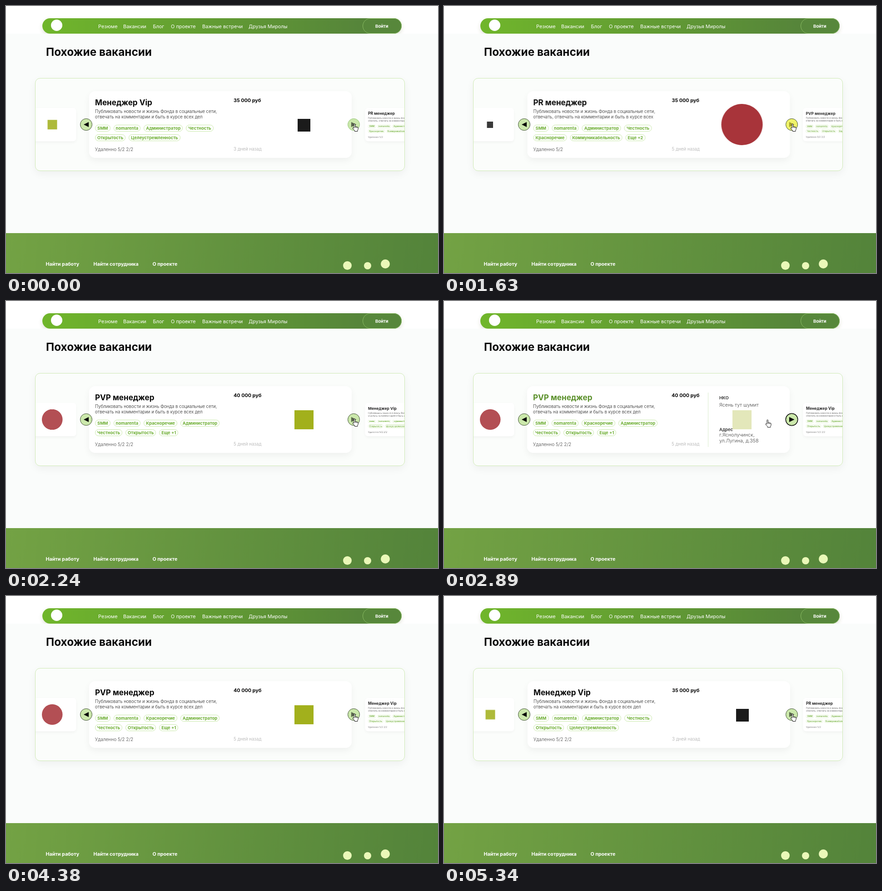
An HTML page for the animation above (5700 ms loop, 951 by 589 pixels).

```html
<!DOCTYPE html>
<html lang="ru">
<head>
<meta charset="utf-8">
<title>Похожие вакансии</title>
<style>
html, body { margin: 0; width: 100%; height: 100%; overflow: hidden; }
body { position: relative; background: #fafcfb; font-family: Inter, "Open Sans", sans-serif; }
div, svg { position: absolute; box-sizing: border-box; }
.text { white-space: nowrap; line-height: 20px; }
header { position: absolute; left: 0; top: 0; width: 100%; height: 61px; background: #fff; overflow: hidden; }
.bar { left: 80px; top: 27px; width: 791px; height: 34px; border-radius: 17px;
  background: linear-gradient(90deg, #70b62b, #56853a 88%); box-shadow: 0 4px 10px rgba(90, 100, 40, .18); }
.login { left: 785px; top: 27px; width: 86px; height: 34px; border-radius: 17px;
  border: 1px solid #8bbd63; background: #57873b; }
footer { position: absolute; left: 0; top: 501px; width: 100%; height: 88px;
  background: linear-gradient(100deg, #73a244, #53833a); }
.frame { left: 64px; top: 159px; width: 814px; height: 205px; border: 1px solid #cfeab5; border-radius: 11px;
  background: #fbfdfb; overflow: hidden; }
.glow { left: 64px; top: 159px; width: 814px; height: 205px; border-radius: 11px; box-shadow: 0 6px 18px rgba(0, 0, 0, .05); }
.track { left: 0; top: 0; width: 100%; height: 100%; }
.card { top: 28px; width: 578px; height: 147px; border-radius: 13px; background: #fff;
  box-shadow: 0 6px 16px rgba(0, 0, 0, .05); }
.tags { left: 13px; display: flex; gap: 7px; }
.tags span { box-sizing: border-box; height: 15px; padding: 0 4px; border: 1px solid #c8e8a8; border-radius: 8px;
  font: 700 9.4px/13px Inter, "Open Sans", sans-serif; color: #6dae32; white-space: nowrap; }
.round { border-radius: 50%; }
.details { left: 0; top: 0; width: 100%; height: 100%; }
.rule { left: 398px; top: 14px; width: 1px; height: 120px; background: #d3e8c0; }
.arrow { top: 248px; width: 27px; height: 27px; border: 1px solid #3a4a30; border-radius: 50%; background: #cbe8ab; color: #000; }
.arrow svg { left: 0; top: 0; width: 25px; height: 25px; fill: currentColor; }
</style>
</head>
<body>
<script>
const LOOP = 5700, STEP = 462.5;
const MOVES = [857, 1718, 4882];

function add(parent, className, style = {}, tag = 'div') {
  const el = document.createElement(tag);
  el.className = className;
  Object.assign(el.style, style);
  parent.append(el);
  return el;
}

// y is the vertical centre of the line
function text(parent, x, y, size, weight, color, str) {
  const el = add(parent, 'text', {
    left: x + 'px', top: y - 10 + 'px', fontSize: size + 'px', fontWeight: weight, color
  });
  el.textContent = str;
  return el;
}

function mark(parent, cx, cy, size, color, round) {
  return add(parent, round ? 'round' : '', {
    left: cx - size / 2 + 'px', top: cy - size / 2 + 'px',
    width: size + 'px', height: size + 'px', background: color
  });
}

// Each row: start in ms, new state, length of the change (0 = hard cut), easing
function play(el, start, rows) {
  let state = start;
  const frames = [{ ...state, offset: 0 }];
  for (const [at, next, length = 0, easing = 'ease'] of rows) {
    frames.push({ ...state, offset: at / LOOP, easing });
    state = { ...state, ...next };
    frames.push({ ...state, offset: (at + length) / LOOP });
  }
  frames.push({ ...state, offset: 1 });
  el.animate(frames, { duration: LOOP, iterations: Infinity });
}

const JOBS = {
  vip: {
    title: 'Менеджер Vip', pay: '35 000 руб', place: 'Удаленно 5/2 2/2', age: '3 дней назад',
    about: 'отвечать на комментарии и быть в курсе всех дел',
    tags: ['SMM,nomarenta,Администратор,Честность', 'Открытость,Целеустремленность'],
    logo: [473, 75, 28, '#1b1b1b', false]
  },
  pr: {
    title: 'PR менеджер', pay: '35 000 руб', place: 'Удаленно 5/2', age: '5 дней назад',
    about: 'отвечать, отвечать на комментарии и быть в курсе всех',
    tags: ['SMM,nomarenta,Администратор,Честность', 'Красноречие,Коммуникабельность,Еще +2'],
    logo: [472, 73.5, 91, '#a8343a', true]
  },
  pvp: {
    title: 'PVP менеджер', pay: '40 000 руб', place: 'Удаленно 5/2 2/2', age: '5 дней назад',
    about: 'отвечать на комментарии и быть в курсе всех дел',
    tags: ['SMM,nomarenta,Красноречие,Администратор', 'Честность,Открытость,Еще +1'],
    logo: [473, 73.5, 42, '#a2b01c', false]
  }
};

function buildCard(track, job, slot) {
  const card = add(track, 'card', { left: 118 + STEP * slot + 'px' });
  const title = text(card, 13, 25, 17.1, 700, '#0a0a0a', job.title);
  text(card, 13, 45, 9.7, 300, '#222', 'Публиковать новости и жизнь Фонда в социальные сети,');
  text(card, 13, 56.5, 9.7, 300, '#222', job.about);
  job.tags.forEach((line, row) => {
    const tags = add(card, 'tags', { top: 74 + 21 * row + 'px' });
    line.split(',').forEach(name => { add(tags, '', {}, 'span').textContent = name; });
  });
  text(card, 13, 127.5, 10.1, 300, '#444', job.place);
  text(card, 318, 20.5, 10.8, 700, '#0a0a0a', job.pay);
  text(card, 318, 127.5, 9.8, 300, '#aaa', job.age);
  const logo = mark(card, ...job.logo);

  const look = active => ({ transform: `scale(${active ? 1 : .5})`, opacity: active ? 1 : .87 });
  play(card, look(slot === 0), MOVES.map((at, i) => [at, look(slot === i + 1), 325]));
  if (slot === 2) addHover(card, title, logo);
}

function addHover(card, title, logo) {
  const details = add(card, 'details');
  add(details, 'rule');
  const line = (y, size, weight, str) => text(details, 423, y, size, weight, '#151515', str);
  line(26, 9.5, 700, 'НКО');
  line(42, 10.75, 300, 'Ясень тут шумит');
  line(95.5, 9.3, 700, 'Адрес');
  line(108, 10.75, 300, 'г.Яснолучинск,');
  line(120.5, 10.75, 300, 'ул.Лугина, д.358');

  const toggle = (el, off, on) => play(el, off, [[2640, on, 500], [4000, off, 350]]);
  toggle(title, { color: '#0a0a0a' }, { color: '#6fb033' });
  toggle(details, { opacity: 0 }, { opacity: 1 });
  toggle(logo, { opacity: 1 }, { opacity: .13 });
}

function buildPage() {
  const header = add(document.body, '', {}, 'header');
  add(header, 'bar');
  add(header, 'login');
  mark(header, 111, 42.5, 25, '#fff', true);
  [[203, 'Резюме'], [258, 'Вакансии'], [323.5, 'Блог'], [363, 'О проекте'],
   [432, 'Важные встречи'], [534, 'Друзья Миролы']]
    .forEach(([x, name]) => text(header, x, 44.5, 10.9, 400, '#fff', name));
  text(header, 813, 44.5, 9.4, 700, '#fff', 'Войти');

  text(document.body, 88, 101, 24.3, 700, '#0a0a0a', 'Похожие вакансии');

  const footer = add(document.body, '', {}, 'footer');
  [[87.5, 'Найти работу'], [192.5, 'Найти сотрудника'], [322.5, 'О проекте']]
    .forEach(([x, name]) => text(footer, x, 69, 10.7, 700, '#fff', name));
  [[751, 71, 19], [795.5, 72, 16], [835, 68, 20]]
    .forEach(([x, y, size]) => mark(footer, x, y, size, '#eaf8b8', true));
}

function buildCarousel() {
  add(document.body, 'glow');
  const track = add(add(document.body, 'frame'), 'track');
  ['pvp', 'vip', 'pr', 'pvp', 'vip', 'pr'].forEach((id, i) => buildCard(track, JOBS[id], i - 1));
  const shift = n => ({ transform: `translateX(${-STEP * n}px)` });
  play(track, shift(0), MOVES.map((at, i) => [at, shift(i + 1), 480]));
}

function buildArrow(x, points) {
  const arrow = add(document.body, 'arrow', { left: x + 'px' });
  arrow.innerHTML = `<svg viewBox="0 0 25 25"><polygon points="${points}"/></svg>`;
  return arrow;
}

function buildControls() {
  buildArrow(163, '7,12.5 18,7 18,18');
  const next = buildArrow(752, '18.5,12.5 7,7 7,18');
  const idle = { borderColor: '#000', color: '#000', boxShadow: '0 0 0 .5px #000' };
  const hover = { borderColor: '#3a4a30', color: '#59664c', boxShadow: '0 0 0 0 #000', backgroundColor: '#cbe8ab' };
  const pressed = { color: '#a5a02c', backgroundColor: '#eff26a' };
  play(next, { ...hover, borderColor: '#90c274' }, [
    [620, hover, 30],
    [820, pressed], [855, hover],
    [1630, pressed], [1730, hover],
    [2560, idle, 100], [4060, hover, 100],
    [4760, pressed], [4860, hover]
  ]);

  const hand = add(document.body, '', { left: '762px', top: '259px', width: '16px', height: '20px' });
  hand.innerHTML = `<svg width="16" height="20" fill="#fff" stroke="#111" stroke-linejoin="round">
    <path d="M4 10.5V2.2a1.3 1.3 0 0 1 2.6 0V7l1.9.2 2 .5 1.8.6q1.2.5 1.1 2l-.5 3.2-1.1 2.2v1.8H5.6v-1.6L1.3 11.4q-.7-1.6.8-2z"/>
    <path d="M6.6 7v3M9 7.4v2.8M11.2 8v2.4" stroke-width=".8"/></svg>`;
  const at = (x, y) => ({ transform: `translate(${x}px, ${y}px)` });
  play(hand, at(0, 0), [
    [2370, at(-38, 1), 400, 'ease-in-out'],
    [2770, at(-68, 3), 300, 'ease-out'],
    [3830, at(0, 0), 400, 'ease-in-out']
  ]);
}

buildPage();
buildCarousel();
buildControls();
</script>
</body>
</html>
```
